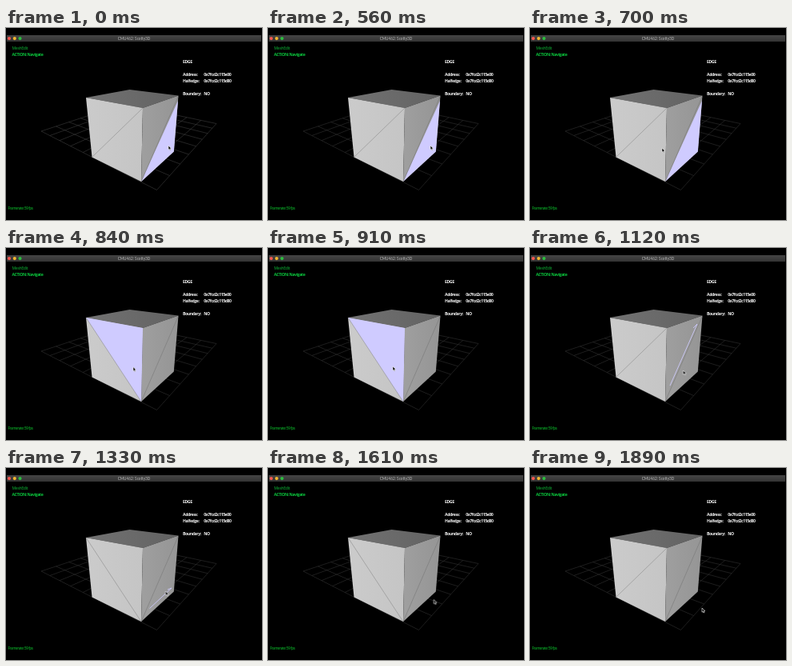
Recreate the animation shown at these times as an HTML page. Size 320 px wide and 240 px high, loop 2.45 s.

```html
<!DOCTYPE html>
<html lang="en">
<head>
<meta charset="utf-8">
<title>Mesh editor</title>
<style>
html, body { margin: 0; width: 100%; height: 100%; overflow: hidden; background: #000; }
svg { display: block; width: 100%; height: 100%; }
text { font: 700 5.2px "Open Sans", "Noto Sans", sans-serif; letter-spacing: -.45px; fill: #f2f2f2; }
.title { font: 400 4.7px Lato, sans-serif; letter-spacing: 0; fill: #bdbdbd; text-anchor: middle; }
.mode { font-weight: 600; fill: #0a8a28; }
.action { fill: #0bc43c; }
.rate { font-size: 4.6px; font-weight: 600; fill: #0a9e24; }
.diag { fill: none; stroke: #8c8c8c; stroke-width: .6; }
.diagRight { stroke: #787878; }
.lit { fill: #cfcbff; }
.half { fill: none; stroke: #cfcbff; stroke-width: .85; stroke-linejoin: round; }

.grid, .base, .flip, .lit, .half { animation: 2450ms step-end infinite; }
.grid { fill: none; stroke: #363636; stroke-width: .55; animation-name: grid; }
.base { animation-name: base; }
.flip { animation-name: flip; }
.litRight { animation-name: litRight; }
.litLeft { animation-name: litLeft; }
.halfDiag { animation-name: halfDiag; }
.halfBase { animation-name: halfBase; }
.cursor { animation: cursor 2450ms infinite; }

@keyframes grid {
  0% { stroke: #424242; }
  22.857%, 100% { stroke: #363636; }
}
@keyframes base {
  0%, 45.714%, 68.571%, 100% { visibility: visible; }
  34.285%, 54.285% { visibility: hidden; }
}
@keyframes flip {
  0%, 45.714%, 68.571%, 100% { visibility: hidden; }
  34.285%, 54.285% { visibility: visible; }
}
@keyframes litRight {
  0% { visibility: visible; }
  31.428%, 100% { visibility: hidden; }
}
@keyframes litLeft {
  0%, 42.857%, 100% { visibility: hidden; }
  34.285% { visibility: visible; }
}
@keyframes halfDiag {
  0%, 51.428%, 100% { visibility: hidden; }
  45.714% { visibility: visible; }
}
@keyframes halfBase {
  0%, 60%, 100% { visibility: hidden; }
  54.285% { visibility: visible; }
}
/* The pointer advances once every 70 ms */
@keyframes cursor {
  0% { transform: translate(203px, 147px); animation-timing-function: step-end; }
  22.857% { transform: translate(203px, 147px); animation-timing-function: steps(2, end); }
  28.571% { transform: translate(165px, 150px); animation-timing-function: steps(3, end); }
  37.142% { transform: translate(156px, 148px); animation-timing-function: steps(3, end); }
  45.714% { transform: translate(191.5px, 153px); animation-timing-function: steps(3, end); }
  54.285% { transform: translate(199.5px, 154px); animation-timing-function: steps(8, end); }
  77.142%, 100% { transform: translate(215px, 175px); animation-timing-function: step-end; }
}
</style>
</head>
<body>
<svg viewBox="0 0 320 240">
  <defs>
    <linearGradient id="bar" x2="0" y2="1"><stop stop-color="#444"/><stop offset="1" stop-color="#343434"/></linearGradient>
    <linearGradient id="top"><stop stop-color="#727272"/><stop offset="1" stop-color="#626262"/></linearGradient>
    <linearGradient id="left"><stop stop-color="#cbcbcb"/><stop offset="1" stop-color="#c5c5c5"/></linearGradient>
    <linearGradient id="right"><stop stop-color="#9f9f9f"/><stop offset="1" stop-color="#959595"/></linearGradient>
  </defs>

  <rect width="320" height="240"/>
  <rect x="1" y="9" width="318" height="8" fill="url(#bar)"/>
  <circle cx="4" cy="13.1" r="2.1" fill="#f4574f"/>
  <circle cx="10.8" cy="13.1" r="2.1" fill="#efb52e"/>
  <circle cx="17.5" cy="13.1" r="2.1" fill="#2dbd40"/>
  <text class="title" x="160" y="14.9">CMU462: Scotty3D</text>

  <path id="grid" class="grid"/>

  <path fill="url(#top)" d="M100 87L154.5 77L215.5 84.5L171 100Z"/>
  <path fill="url(#left)" d="M100 87L171 100L169 192L107.5 161.5Z"/>
  <path fill="url(#right)" d="M171 100L215.5 84.5L209.8 154.5L169 192Z"/>
  <path class="lit litRight" d="M215 91L209.8 154.5L169 192Z"/>
  <path class="lit litLeft" d="M100 87L171 100L169 192Z"/>
  <path class="diag diagRight" d="M215 86L169 192"/>
  <path class="diag base" d="M171 100L107.5 161.5"/>
  <path class="diag flip" d="M100 87L169 192"/>
  <path class="half halfDiag" d="M175 172L209 95L204 100"/>
  <path class="half halfBase" d="M179.5 175.5L207 150L202 152"/>

  <text class="mode" x="7.5" y="27.2">MeshEdit</text>
  <text class="action" x="7.5" y="35.2">ACTION: Navigate</text>
  <text x="221" y="43.7">EDGE</text>
  <text x="221" y="59.7">Address:</text>
  <text x="247.3" y="59.7">0x7fcd2c115e00</text>
  <text x="221" y="67.7">Halfedge:</text>
  <text x="247.3" y="67.7">0x7fcd2c115d80</text>
  <text x="221" y="83.7">Boundary:</text>
  <text x="247.3" y="83.7">NO</text>
  <text class="rate" x="2.5" y="226.8">Framerate: 59 fps</text>

  <path class="cursor" d="M0 0V5.2L1.2 4.2L2 6L3 5.5L2.2 3.8H3.8Z" fill="#000" stroke="#eee" stroke-width=".65"/>
</svg>
<script>
// Perspective floor: unit square mapped onto corners a, b, c, d
const [a, b, c, d] = [[44, 129], [188.5, 202.5], [263, 119.5], [147, 95]];
const cells = 8;
const sum = [0, 1].map(i => a[i] - b[i] + c[i] - d[i]);
const bc = [0, 1].map(i => b[i] - c[i]);
const dc = [0, 1].map(i => d[i] - c[i]);
const cross = (p, q) => p[0] * q[1] - p[1] * q[0];
const g = cross(sum, dc) / cross(bc, dc);
const h = cross(bc, sum) / cross(bc, dc);

const project = (u, v) => [0, 1].map(i =>
  ((b[i] - a[i] + g * b[i]) * u + (d[i] - a[i] + h * d[i]) * v + a[i]) / (g * u + h * v + 1));
const line = (p, q) => `M${p}L${q}`;

let path = "";
for (let i = 0; i <= cells; i++) {
  const t = i / cells;
  path += line(project(t, 0), project(t, 1)) + line(project(0, t), project(1, t));
}
document.getElementById("grid").setAttribute("d", path);
</script>
</body>
</html>
```
